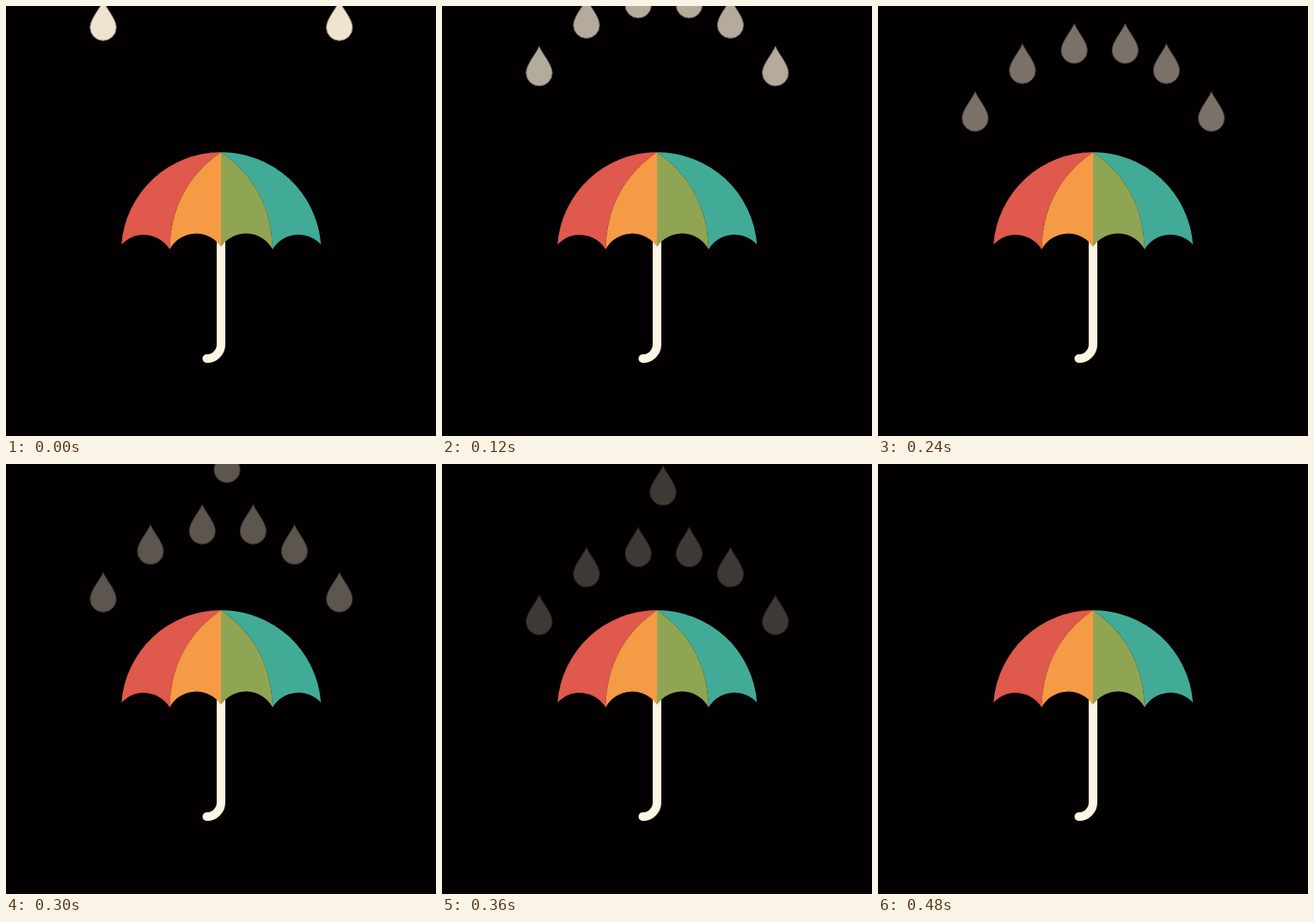
Write an HTML page that moves like this. It is 500x500 px and loops after 1620 ms.

```html
<!DOCTYPE html>
<html lang="en">
<head>
<meta charset="utf-8">
<title>Umbrella and raindrops</title>
<style>
  html, body { margin: 0; width: 100%; height: 100%; overflow: hidden; background: #030001; }
  svg { display: block; width: 100vw; height: 100vh; }
</style>
</head>
<body>
<svg viewBox="0 0 500 500">
  <defs>
    <path id="drop" d="M0 -31C3 -23 15.2 -10 15.2 0A15.2 15.2 0 0 1 -15.2 0C-15.2 -10 -3 -23 0 -31Z"
          fill="#f0e4d0" stroke="#8a8378" stroke-width="1"/>
  </defs>
  <g id="rain"></g>
  <path d="M250 270V393.5A16.5 16.5 0 0 1 233.5 410" fill="none" stroke="#fef5e4" stroke-width="10" stroke-linecap="round"/>
  <path fill="#df594c" d="M250 170A116 116 0 0 0 134.3 277.5A35 35 0 0 1 190.2 283Q192 210 250 170Z"/>
  <path fill="#42ab98" d="M250 170A116 116 0 0 1 366.2 277.5A35 35 0 0 0 310 283Q308 210 250 170Z"/>
  <path fill="#f59a45" d="M250 170Q192 210 190.2 283A35 35 0 0 1 250 280Z"/>
  <path fill="#90a553" d="M250 170Q308 210 310 283A35 35 0 0 0 250 280Z"/>
</svg>
<script>
  const LOOP = 1620, STEP = 30, FALL = 480, SPEED = 0.44;
  const rain = document.getElementById('rain');

  // Starting centre of each drop
  const drops = [
    [113, 25], [387.7, 25],
    [168, -30.5], [335.4, -30.5],
    [228.2, -54], [287.4, -54],
    [257, -125.5]
  ].map(([x, y]) => {
    const node = document.createElementNS('http://www.w3.org/2000/svg', 'use');
    node.setAttribute('href', '#drop');
    rain.append(node);
    return { node, x, y };
  });

  function render(time) {
    const t = Math.min(Math.floor((time % LOOP) / STEP) * STEP, FALL);
    for (const { node, x, y } of drops) {
      node.setAttribute('transform', `translate(${x} ${y + t * SPEED})`);
      node.setAttribute('opacity', 1 - t / FALL);
    }
  }

  const start = performance.now();
  function tick() {
    render(performance.now() - start);
    requestAnimationFrame(tick);
  }
  tick();
</script>
</body>
</html>
```
